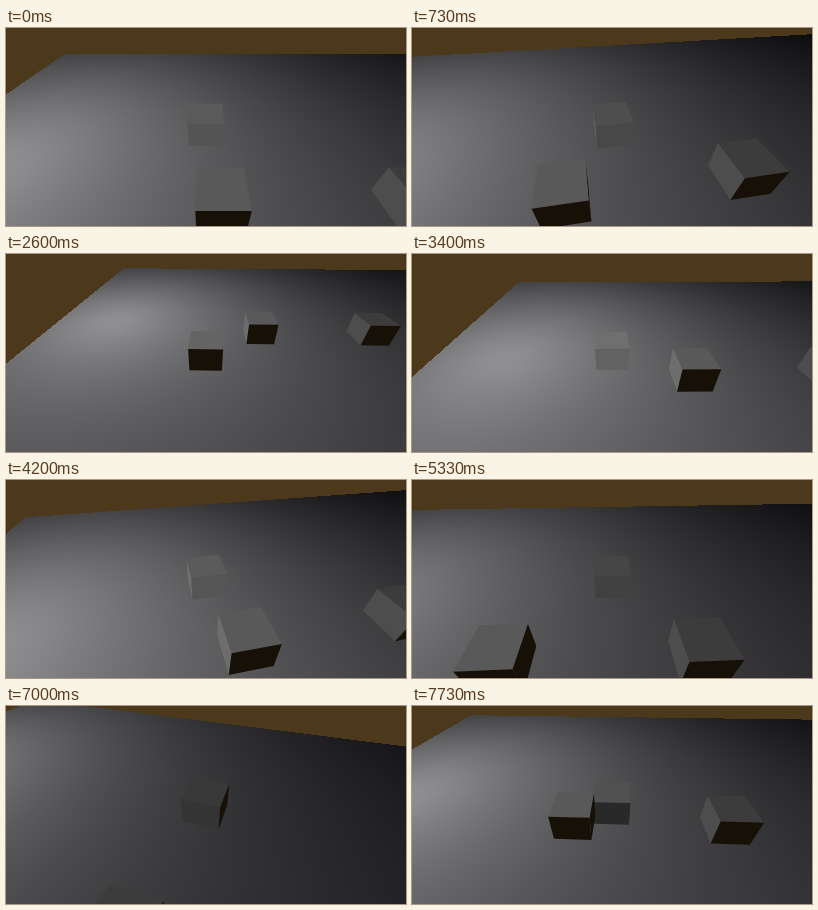
Animation of 400 by 198 pixels, one loop 7800 ms. Source, as an HTML page with a canvas:

```html
<!DOCTYPE html>
<html lang="en">
<head>
<meta charset="utf-8">
<title>Cube on a metal floor</title>
<style>
html, body { margin: 0; width: 100%; height: 100%; overflow: hidden; background: #4c381b; }
canvas { display: block; width: 100vw; height: 100vh; }
</style>
</head>
<body>
<canvas id="stage" width="400" height="198"></canvas>
<script>
const W = 400, H = 198, FOCAL = 212, LOOP = 7800;
const CAM_Y = 4, CAM_Z = 5, LAG = 0.2;
const TOP = 0.5, GROUND = -0.3;
const FLOOR = { left: -10.4, back: -9.5 };
const BLOCKS = [[-2.05, 0], [2.05, 0]];
const ctx = document.getElementById('stage').getContext('2d');
const image = ctx.createImageData(W, H);

// Waypoints of the moving cube: seconds, position and velocity on the floor
const PATH = [
  { t: 0.13, p: [-2.36, -2.5], v: [0, 0] },
  { t: 1.33, p: [0, -0.1], v: [-3, 5] },
  { t: 2.6, p: [-4, 1.5], v: [-0.6, -2.2] },
  { t: 4.2, p: [-2.45, -2.35], v: [5, 0.5] },
  { t: 5.33, p: [0.3, -2.55], v: [1, 0] },
  { t: 6.27, p: [5, -5.7], v: [1.25, 0] },
  { t: 7.73, p: [-1.05, -0.6], v: [-1, 1.2] }
];

const clamp = v => Math.max(0, Math.min(1, v));
const dot = (a, b) => a[0] * b[0] + a[1] * b[1] + a[2] * b[2];

// Cubic Hermite curve through the waypoints
function place(t) {
  let i = 0;
  while (i < PATH.length - 2 && t >= PATH[i + 1].t) i++;
  const a = PATH[i], b = PATH[i + 1], span = b.t - a.t;
  const u = Math.max(0, (t - a.t) / span), w = 1 - u;
  return [0, 1].map(k =>
    a.p[k] * w * w * (1 + 2 * u) + b.p[k] * u * u * (3 - 2 * u) +
    span * u * w * (a.v[k] * w - b.v[k] * u));
}

// The camera trails the cube in proportion to its speed and looks at it
function makeCamera(t) {
  const [px, pz] = place(t), e = 0.001;
  const ahead = place(t + e), behind = place(t - e);
  const [vx, vz] = ahead.map((v, k) => (v - behind[k]) / (2 * e));
  const ox = -LAG * vx, oz = CAM_Z - LAG * vz;
  const flat = Math.hypot(ox, oz), dist = Math.hypot(flat, CAM_Y);
  return {
    pos: [px + ox, CAM_Y, pz + oz],
    forward: [-ox / dist, -CAM_Y / dist, -oz / dist],
    right: [oz / flat, 0, -ox / flat],
    up: [-ox * CAM_Y / (flat * dist), flat / dist, -oz * CAM_Y / (flat * dist)]
  };
}

// Brightness falls off around a lamp at the left of the floor
function light(x, z) {
  return Math.max(6, 165 * Math.exp(-Math.hypot(x + 8, z + 1, 1) / 11) - 8);
}

function drawFloor({ forward, right, up, pos }) {
  const px = image.data;
  let n = 0;
  for (let y = 0; y < H; y++) {
    const v = (H / 2 - y - 0.5) / FOCAL;
    const reach = (GROUND - CAM_Y) / (forward[1] + up[1] * v);
    for (let x = 0; x < W; x++, n += 4) {
      const h = (x + 0.5 - W / 2) / FOCAL;
      const wx = pos[0] + reach * (forward[0] + right[0] * h + up[0] * v);
      const wz = pos[2] + reach * (forward[2] + right[2] * h + up[2] * v);
      if (wx < FLOOR.left || wz < FLOOR.back) {
        px[n] = 76; px[n + 1] = 56; px[n + 2] = 27;
      } else {
        const g = light(wx, wz);
        px[n] = g + 1; px[n + 1] = g; px[n + 2] = g + 2;
      }
      px[n + 3] = 255;
    }
  }
  ctx.putImageData(image, 0, 0);
}

function drawFace(points, g) {
  ctx.fillStyle = `rgb(${Math.max(22, g)},${Math.max(16, g)},${Math.max(7, g)})`;
  ctx.beginPath();
  points.forEach(p => ctx.lineTo(p[0], p[1]));
  ctx.fill();
}

function drawCube([x, z], cam) {
  const corners = [];
  for (let i = 0; i < 8; i++) {
    const p = [x + (i & 1) - 0.5, i & 2 ? TOP : GROUND, z + (i >> 2) - 0.5];
    const d = p.map((v, k) => v - cam.pos[k]);
    const depth = dot(d, cam.forward);
    if (depth < 0.5) return;
    corners.push([W / 2 + FOCAL * dot(d, cam.right) / depth,
                  H / 2 - FOCAL * dot(d, cam.up) / depth]);
  }
  const face = (ids, g) => drawFace(ids.map(i => corners[i]), g);
  const g = light(x, z);
  if (cam.pos[0] < x - 0.5) face([0, 2, 6, 4], g * 1.1 + 14);
  if (cam.pos[0] > x + 0.5) face([1, 3, 7, 5], 0);
  face([2, 3, 7, 6], g + 2);
  face([4, 5, 7, 6], g * 0.95 * clamp((-0.1 - z) * 1.1));
}

function draw(now) {
  // The picture advances fifteen times a second
  const t = Math.floor((now % LOOP + 4) * 0.015) / 15;
  const cam = makeCamera(t);
  drawFloor(cam);
  [...BLOCKS, place(t)].sort((a, b) => a[1] - b[1]).forEach(c => drawCube(c, cam));
}

const start = performance.now();
function tick() {
  draw(performance.now() - start);
  requestAnimationFrame(tick);
}
tick();
</script>
</body>
</html>
```
